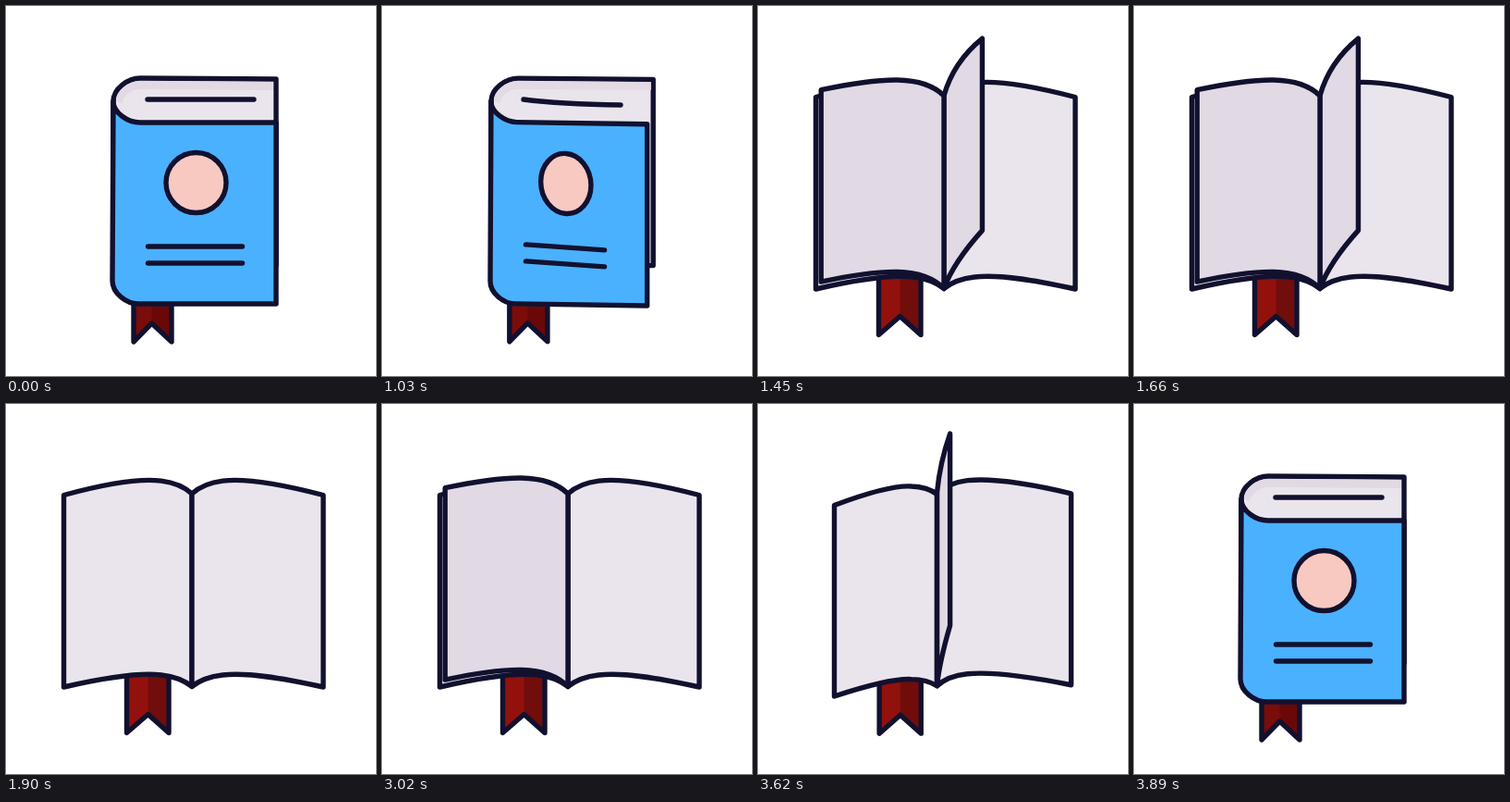
These frames come from a looping animation (400x400 px, 3.92 s). An HTML page with a canvas:

```html
<!DOCTYPE html>
<html lang="en">
<head>
<meta charset="utf-8">
<title>Book</title>
<style>
  html, body { margin: 0; width: 100%; height: 100%; overflow: hidden; background: #fff; }
  canvas { display: block; width: 400px; height: 400px; }
</style>
</head>
<body>
<canvas id="stage" width="400" height="400"></canvas>
<script>
const ctx = document.getElementById('stage').getContext('2d');
const LOOP = 3920, STEP = 30, STEPS = 30, OPEN_STEPS = 11;
const PAGES = 3, FIRST_TURN = 3, TURN_GAP = 7, TURN_STEPS = 13;
const SPINE = { x: 201, y: 97 }, REACH = 142, LEFT_REACH = 138.5, TIP_Y = 98.5;
const INK = '#11112f', PAPER = '#eae5ec', SHADE = '#e1d9e4', BLUE = '#4ab1ff', PINK = '#f7c9c1';

const { sin, cos, PI } = Math;
const lerp = (a, b, t) => a + (b - a) * t;
const between = (p, q, t) => [lerp(p[0], q[0], t), lerp(p[1], q[1], t)];
const mix = (a, b, t) => a.map((p, i) => between(p, b[i], t));
const smooth = t => t * t * (3 - 2 * t);

// Top and bottom edge of an open page; angle 0 lies right, PI lies left.
function pageAt(angle) {
  const c = cos(angle), s = Math.abs(sin(angle));
  const reach = c > 0 ? REACH : LEFT_REACH;
  const lift = 64 * s ** 1.5 * (1 + 0.2 * c);
  const top = [
    [SPINE.x, SPINE.y],
    [SPINE.x + 24 * c, SPINE.y - 22 - 3 * s],
    [SPINE.x + 69 * c, SPINE.y - 17.5 - 24 * s * (1 + 0.6 * c)],
    [SPINE.x + reach * c, TIP_Y - lift]
  ];
  const bow = 210.5 + 6 * sin(2 * angle);
  const drops = [208.5, bow, bow, 207.5];
  return { top, bottom: top.map(([x, y], i) => [x, y + drops[i]]) };
}

// Splits one cubic into two, so that it can morph into a rounded corner.
function split([a, b, c, d], t = 0.35) {
  const ab = between(a, b, t), bc = between(b, c, t), cd = between(c, d, t);
  const abc = between(ab, bc, t), bcd = between(bc, cd, t);
  return [a, ab, abc, between(abc, bcd, t), bcd, cd, d];
}

// A quarter ellipse from start to knee, then a straight run to the tip.
function corner(start, knee, tip) {
  return [
    start, [start[0], lerp(start[1], knee[1], 0.55)], [lerp(knee[0], start[0], 0.45), knee[1]],
    knee, between(knee, tip, 1 / 3), between(knee, tip, 2 / 3), tip
  ];
}

const closedBlock = {
  top: corner([116, 103], [145, 78], [292, 79]),
  bottom: corner([116, 297], [145, 279], [292, 280])
};
const closedCover = {
  top: corner([116, 103], [145, 126], [292, 126]),
  bottom: corner([115, 297], [143, 322], [292, 322])
};

function morph(closed, angle, e, lift = 0) {
  const open = pageAt(angle);
  const edge = side => mix(closed[side], split(open[side]), e)
    .map(([x, y], i) => [x, y + lift * (i / 6) ** 2]);
  return { top: edge('top'), bottom: edge('bottom') };
}

function curve(pts) {
  for (let i = 1; i < pts.length; i += 3) {
    ctx.bezierCurveTo(...pts[i], ...pts[i + 1], ...pts[i + 2]);
  }
}

function drawSheet({ top, bottom }, fill) {
  const back = [...bottom].reverse();
  ctx.beginPath();
  ctx.moveTo(...top[0]);
  curve(top);
  ctx.lineTo(...back[0]);
  curve(back);
  ctx.closePath();
  ctx.fillStyle = fill;
  ctx.fill();
  ctx.stroke();
}

function tracePolygon(pts) {
  ctx.beginPath();
  pts.forEach(p => ctx.lineTo(...p));
  ctx.closePath();
}

function drawRibbon(e) {
  const left = lerp(138, 130.5, e), right = lerp(179, 176, e), fold = lerp(157.5, 153.5, e);
  const top = lerp(312, 285, e), end = lerp(363, 355.5, e), notch = lerp(343, 335.5, e);
  const tone = (a, b) => `rgb(${a.map((v, i) => Math.round(lerp(v, b[i], e)))})`;
  const outline = [[left, top], [right, top], [right, end], [fold, notch], [left, end]];

  tracePolygon(outline);
  ctx.fillStyle = tone([122, 12, 10], [147, 17, 13]);
  ctx.fill();
  tracePolygon([[fold, top], ...outline.slice(1, 4)]);
  ctx.fillStyle = tone([106, 8, 8], [113, 13, 10]);
  ctx.fill();
  tracePolygon(outline);
  ctx.stroke();
}

function drawTopEdge(k, shift) {
  if (k > 5) return;
  ctx.save();
  ctx.translate(shift, 0);
  ctx.globalAlpha = 1 - k / 6;
  ctx.beginPath();
  ctx.moveTo(119, 103);
  curve(corner([119, 103], [145, 81], [289, 82]));
  ctx.lineTo(289, 91);
  curve(corner([126, 105], [145, 90], [289, 91]).reverse());
  ctx.fillStyle = SHADE;
  ctx.fill();
  ctx.globalAlpha = 1;
  ctx.beginPath();
  ctx.moveTo(153 - 2 * k, 101);
  ctx.quadraticCurveTo(190, 101 + 5 * k, 268 - 12 * k, 101 + 6 * k);
  ctx.stroke();
  ctx.restore();
}

// Drawn inside the current cover path; narrows and slants as the cover lifts.
function drawEmblem(k) {
  const scale = 1 - 0.165 * k, slope = 0.07 * k;
  const offset = 165 * (1 - scale);
  const trace = draw => {
    ctx.save();
    ctx.transform(scale, slope * scale, 0, 1, offset, slope * (offset - 185));
    ctx.beginPath();
    draw();
    ctx.restore();
  };
  ctx.save();
  ctx.clip();
  trace(() => ctx.arc(205.5, 191, 32.5, 0, 2 * PI));
  ctx.fillStyle = PINK;
  ctx.fill();
  ctx.stroke();
  for (const y of [260, 278]) {
    trace(() => { ctx.moveTo(153.5, y); ctx.lineTo(255.5, y); });
    ctx.stroke();
  }
  ctx.restore();
}

// Pages in mid-turn, fitted to the block while the book is still opening.
function turningPages(k, block) {
  const [spineX] = block.top[0], [tipX, tipY] = block.top[6];
  const fit = ([x, y]) => [spineX + (x - SPINE.x) * (tipX - spineX) / REACH, y + tipY - TIP_Y];
  const pages = [];
  for (let i = 0; i < PAGES; i++) {
    const t = (k - FIRST_TURN - i * TURN_GAP) / TURN_STEPS;
    if (t <= 0 || t >= 1) continue;
    const angle = PI * t + 0.1 * sin(2 * PI * t);
    const { top, bottom } = pageAt(angle);
    pages.push({ top: top.map(fit), bottom: bottom.map(fit), onRight: angle < PI / 2 });
  }
  return pages;
}

function drawBook(k) {
  const e = smooth(Math.min(k / OPEN_STEPS, 1));
  const block = morph(closedBlock, 0, e);
  const cover = morph(closedCover, PI, e, 32 * sin(PI * e));
  const coverOnRight = cover.top[6][0] > block.top[0][0];
  const pages = turningPages(k, block);
  const drawPage = page => drawSheet(page, SHADE);

  ctx.clearRect(0, 0, 400, 400);
  ctx.strokeStyle = INK;
  ctx.lineWidth = 5.4;
  ctx.lineJoin = ctx.lineCap = 'round';

  drawRibbon(e);
  if (!coverOnRight) drawSheet(cover, PAPER);
  drawSheet(block, PAPER);
  drawTopEdge(k, block.top[0][0] - 116);
  pages.filter(p => p.onRight).reverse().forEach(drawPage);
  pages.filter(p => !p.onRight).forEach(drawPage);
  if (coverOnRight) {
    drawSheet(cover, BLUE);
    drawEmblem(k);
  }
}

function stateAt(ms) {
  const steps = from => Math.min(STEPS, Math.max(0, Math.floor((ms - from) / STEP)));
  return steps(1000) - steps(2990);
}

const begin = performance.now();
function frame() {
  drawBook(stateAt((performance.now() - begin) % LOOP));
  requestAnimationFrame(frame);
}
frame();
</script>
</body>
</html>
```
